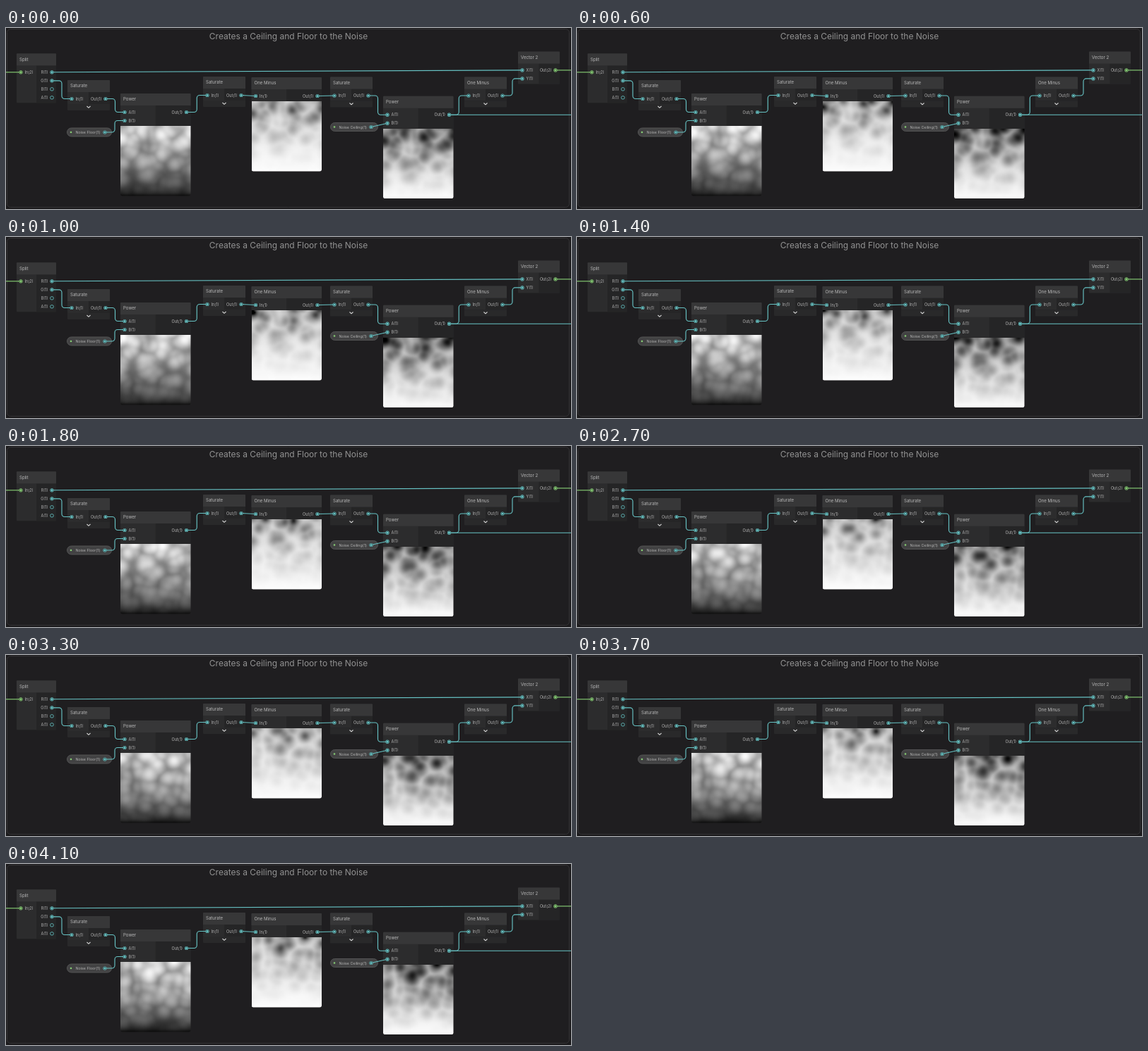
These frames come from a looping animation (800x257 px, 4200 ms). An HTML page with a canvas:

```html
<!DOCTYPE html>
<html lang="en">
<head>
<meta charset="utf-8">
<title>Noise ceiling and floor graph</title>
<style>
  html, body { margin: 0; width: 100%; height: 100%; overflow: hidden; background: #1f1e20; }
  canvas { display: block; }
</style>
</head>
<body>
<canvas id="stage" width="800" height="257"></canvas>
<script>
const ctx = document.getElementById('stage').getContext('2d');
const TEAL = '#67c3c4', GREEN = '#86cc74';
const LOOP = 4200, STEP = 100;
const HEADER = 17, ROW = 12, FOLD = 9, PREVIEW = 99.5, GRID = 50;

// ---------- graph model ----------
// Port type (2) is a vector and green, type (1) is a scalar and teal
const port = (label, x, y, side) =>
  ({ label, x, y, side, colour: label.endsWith('(2)') ? GREEN : TEAL, linked: false });

function node(title, x, y, w, ins, outs, extra = {}) {
  const column = (labels, px, side) =>
    labels.map((label, i) => port(label, px, y + 26.5 + i * ROW, side));
  const h = 22 + ROW * Math.max(ins.length, outs.length);
  return { title, x, y, w, h, ins: column(ins, x + 6, 1), outs: column(outs, x + w - 6, -1), ...extra };
}

const unary = (title, x, y) => node(title, x, y, 60, ['In(1)'], ['Out(1)'], { fold: true });
const power = (x, y, shade) => node('Power', x, y, 99.5, ['A(1)', 'B(1)'], ['Out(1)'], { shade });
const pill = (label, x, y, w) => ({ label, x, y, w, outs: [port('', x + w - 9.5, y + 6, -1)] });

const split = node('Split', 15, 36.3, 56, ['In(2)'], ['R(1)', 'G(1)', 'B(1)', 'A(1)']);
const saturateIn = unary('Saturate', 87, 74);
const floorPower = power(162, 93, v => v);
const saturateFloor = unary('Saturate', 279, 69);
const invert = node('One Minus', 347.5, 70, 99.5, ['In(1)'], ['Out(1)'], { shade: v => 1 - v });
const saturateInverse = unary('Saturate', 459, 69.5);
const ceilingPower = power(534, 96.7, v => (1 - v) ** 1.9);
const invertBack = unary('One Minus', 649, 69.5);
const vector = node('Vector 2', 725, 33.4, 59, ['X(1)', 'Y(1)'], ['Out(2)']);
const floorValue = pill('Noise Floor(1)', 86.5, 142, 63);
const ceilingValue = pill('Noise Ceiling(1)', 459.5, 134.5, 67);

const nodes = [split, saturateIn, floorPower, saturateFloor, invert,
  saturateInverse, ceilingPower, invertBack, vector];
const pills = [floorValue, ceilingValue];

const wires = [];
function connect(from, to, input = 0, output = 0) {
  const a = from.outs[output], b = to.ins[input];
  a.linked = b.linked = true;
  wires.push([a, b]);
}
const chain = [saturateIn, floorPower, saturateFloor, invert, saturateInverse, ceilingPower, invertBack];
chain.slice(1).forEach((to, i) => connect(chain[i], to));
connect(split, vector);
connect(split, saturateIn, 0, 1);
connect(invertBack, vector, 1);
connect(floorValue, floorPower, 1);
connect(ceilingValue, ceilingPower, 1);

// Wires that leave the stage
const toEdge = (p, x) => {
  p.linked = true;
  wires.push([p, { x, y: p.y }]);
};
toEdge(split.ins[0], 0);
toEdge(vector.outs[0], 800);
toEdge(ceilingPower.outs[0], 800);

// ---------- graph drawing ----------
function text(label, x, y, size, colour, align = 'left') {
  ctx.font = `${size}px Inter, sans-serif`;
  ctx.fillStyle = colour;
  ctx.textAlign = align;
  ctx.textBaseline = 'middle';
  ctx.fillText(label, x, y);
}

function box(x, y, w, h, radius, fill, stroke) {
  ctx.beginPath();
  ctx.roundRect(x, y, w, h, radius);
  if (fill) { ctx.fillStyle = fill; ctx.fill(); }
  if (stroke) { ctx.strokeStyle = stroke; ctx.lineWidth = 1; ctx.stroke(); }
}

function line(colour, width, trace) {
  ctx.strokeStyle = colour;
  ctx.lineWidth = width;
  ctx.beginPath();
  trace();
  ctx.stroke();
}

function dot(x, y, r, colour) {
  ctx.fillStyle = colour;
  ctx.beginPath();
  ctx.arc(x, y, r, 0, 7);
  ctx.fill();
}

function drawPort({ x, y, colour, linked }) {
  dot(x, y, 2.6, colour);
  dot(x, y, 1.9, '#1f2223');
  if (linked) dot(x, y, 1.6, colour);
}

function drawNode({ title, x, y, w, h, fold, ins, outs }) {
  box(x, y, w, h, 1, '#2c2c2d');
  box(x + w / 2, y + HEADER, w / 2, h - HEADER, 0, '#252526');
  box(x, y, w, HEADER, [1, 1, 0, 0], '#373738');
  text(title, x + 4, y + HEADER / 2, 6.1, '#b9b9b9');
  if (fold) {
    const cx = x + w / 2, cy = y + h + 4;
    box(x, y + h, w, FOLD, [0, 0, 1, 1], '#29292a');
    line('#d8d8d8', 1.1, () => {
      ctx.moveTo(cx - 2.5, cy - 1);
      ctx.lineTo(cx, cy + 1.3);
      ctx.lineTo(cx + 2.5, cy - 1);
    });
  }
  for (const p of [...ins, ...outs])
    text(p.label, p.x + 5.5 * p.side, p.y + 0.4, 5.5, '#b4b4b4', p.side > 0 ? 'left' : 'right');
}

function drawPill({ label, x, y, w }) {
  box(x, y, w, 12, 6, '#424243', '#545455');
  dot(x + 5.5, y + 6, 1.3, GREEN);
  text(label, x + 12, y + 6.4, 5.35, '#b4b4b4');
}

// Level wires run straight, others bend halfway
function drawWire([a, b]) {
  const mid = (a.x + b.x) / 2, drop = Math.abs(b.y - a.y);
  line(a.colour, 1.15, () => {
    ctx.moveTo(a.x, a.y);
    if (drop > 6) {
      ctx.arcTo(mid, a.y, mid, b.y, 4);
      ctx.arcTo(mid, b.y, b.x, b.y, 4);
    }
    ctx.lineTo(b.x, b.y);
  });
}

function drawGraph() {
  ctx.fillStyle = '#1b1a1c';
  ctx.fillRect(0, 0, 800, 257);
  box(1.5, 1.5, 796, 253, 5, '#1f1e20', '#353436');
  text('Creates a Ceiling and Floor to the Noise', 400, 12.1, 11.97, '#929292', 'center');
  nodes.forEach(drawNode);
  pills.forEach(drawPill);
  wires.forEach(drawWire);
  for (const { ins = [], outs } of [...nodes, ...pills]) [...ins, ...outs].forEach(drawPort);
}

// ---------- noise ----------
const hash = (x, y, seed) => {
  const s = Math.sin(x * 127.1 + y * 311.7 + seed * 74.7) * 43758.5453;
  return s - Math.floor(s);
};

// Soft cells: about 1 at a cell's centre, low on its border
function cells(x, y, seed) {
  const cx = Math.floor(x), cy = Math.floor(y);
  let sum = 0;
  for (let i = cx - 1; i <= cx + 1; i++)
    for (let j = cy - 1; j <= cy + 1; j++) {
      const dx = i + hash(i, j, seed) - x, dy = j + hash(i, j, seed + 1) - y;
      sum += Math.exp(-8 * (dx * dx + dy * dy));
    }
  return Math.max(0, 1 + Math.log(sum) / 8);
}

// Two cell layers rise at different speeds and fade out towards the bottom
function noiseField(t) {
  return Float32Array.from({ length: GRID * GRID }, (_, k) => {
    const x = (k % GRID + .5) * PREVIEW / GRID;
    const y = (Math.floor(k / GRID) + .5) * PREVIEW / GRID;
    const n = cells(x / 22, (y + 22 * t) / 22, 3) * cells(x / 17, (y + 13 * t) / 17, 11);
    return Math.min(1, (1 - y / PREVIEW) ** 1.15 * (.3 + .75 * n ** 1.8));
  });
}

const tile = document.createElement('canvas');
tile.width = tile.height = GRID;
const tileCtx = tile.getContext('2d');
const pixels = tileCtx.createImageData(GRID, GRID);

function drawPreview({ x, y, h, shade }, field) {
  field.forEach((v, k) => {
    const grey = 252 * shade(v) ** (1 / 2.2);
    pixels.data.set([grey, grey, grey, 255], k * 4);
  });
  tileCtx.putImageData(pixels, 0, 0);
  ctx.save();
  box(x, y + h, PREVIEW, PREVIEW, [0, 0, 3, 3]);
  ctx.clip();
  ctx.imageSmoothingQuality = 'high';
  ctx.drawImage(tile, x, y + h, PREVIEW, PREVIEW);
  ctx.restore();
}

// ---------- playback ----------
let shown = -1;
function play() {
  const step = Math.floor(performance.now() % LOOP / STEP);
  if (step !== shown) {
    shown = step;
    const field = noiseField(step * STEP / 1000);
    drawGraph();
    nodes.filter(n => n.shade).forEach(n => drawPreview(n, field));
  }
  requestAnimationFrame(play);
}
play();
</script>
</body>
</html>
```
